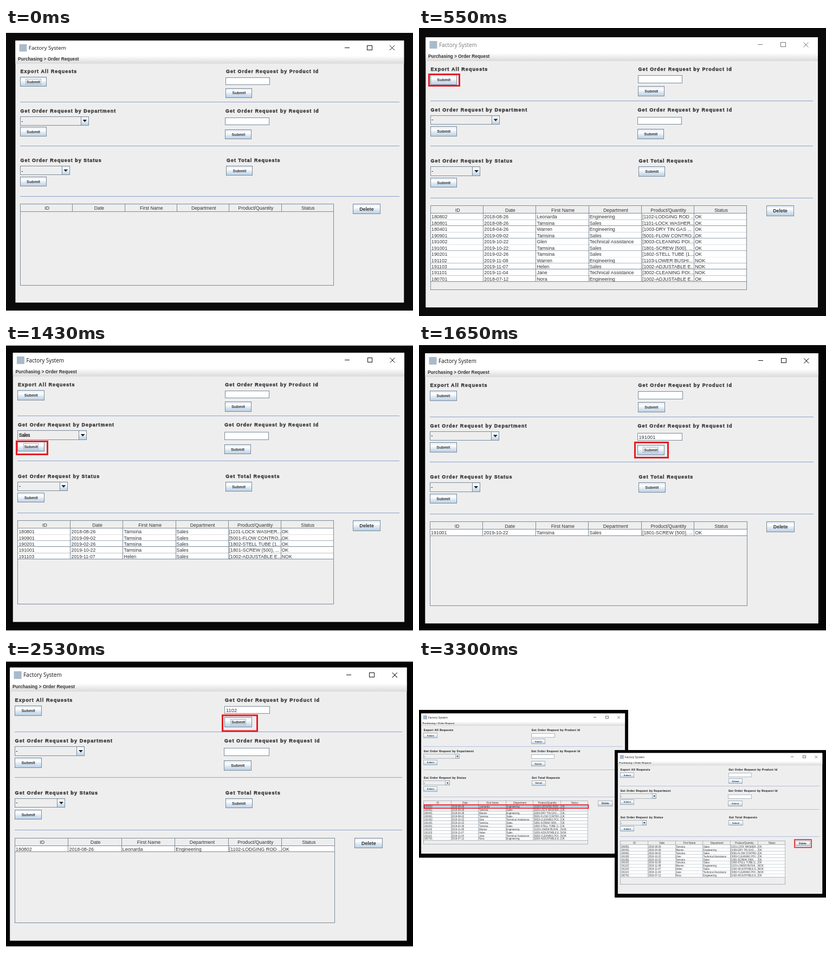
Recreate the animation shown at these times as an HTML page with a canvas. Size 751 by 531 pixels, loop 3.85 s.

```html
<!DOCTYPE html>
<html lang="en">
<head>
<meta charset="utf-8">
<title>Factory System</title>
<style>
  html, body { margin: 0; width: 100%; height: 100%; overflow: hidden; background: #fff; }
  canvas { display: block; }
</style>
</head>
<body>
<canvas id="stage" width="751" height="531"></canvas>
<script>
const ctx = document.getElementById('stage').getContext('2d');
const STEP = 550;
const SANS = '"Liberation Sans", Arial, sans-serif';
const BORDER = '#7a8a99', INK = '#333', RED = '#e61b23';

const columns = ['ID', 'Date', 'First Name', 'Department', 'Product/Quantity', 'Status'];
const orders = `
180802|2018-08-26|Leonarda|Engineering|[1102-LODGING ROD ...|OK
180801|2018-08-26|Tamsina|Sales|[1101-LOCK WASHER...|OK
180401|2018-04-26|Warren|Engineering|[1003-DRY TIN GAS ...|OK
190901|2019-09-02|Tamsina|Sales|[5001-FLOW CONTRO...|OK
191002|2019-10-22|Glen|Technical Assistance|[3003-CLEANING POI...|OK
191001|2019-10-22|Tamsina|Sales|[1801-SCREW (500), ...|OK
190201|2019-02-26|Tamsina|Sales|[1802-STELL TUBE (1...|OK
191102|2019-11-08|Warren|Engineering|[1103-LOWER BUSHI...|NOK
191103|2019-11-07|Helen|Sales|[1002-ADJUSTABLE E...|NOK
191101|2019-11-04|Jane|Technical Assistance|[3002-CLEANING POI...|NOK
180701|2018-07-12|Nora|Engineering|[1002-ADJUSTABLE E...|OK`.trim().split('\n').map(line => line.split('|'));
const pick = (...ids) => ids.map(id => orders.find(order => order[0] === id));

// place: [x, y, x scale, y scale] of the window layout on the stage
const scenes = [
  { dark: '#0a0a0a', top: 9, bottom: 521, windows: [{ place: [5.2, 6.54, .9906, .97], focus: 'export' }] },
  { dark: '#0a0a0a', top: 0, bottom: 531, mark: [18.5, 85.5, 56, 21],
    windows: [{ place: [0, 0, 1, 1], rows: orders, inactive: true }] },
  { dark: '#070707', top: 3, bottom: 528, paper: '#e9eeea', mark: [19.5, 179.5, 57, 24],
    windows: [{ place: [.5, -.94, .998, .9965], focus: 'department', department: 'Sales',
      rows: pick('180801', '190901', '190201', '191001', '191103') }] },
  { dark: '#050506', top: 2, bottom: 528, mark: [398.5, 181.5, 61, 28],
    windows: [{ place: [-1.06, 0, 1.0026, 1], focus: 'request', request: '191001', rows: pick('191001') }] },
  { dark: '#030303', top: 3, bottom: 528, mark: [399.5, 102, 64, 29],
    windows: [{ place: [-5.26, -3.55, 1.012, 1.0115], focus: 'product', product: '1102', rows: pick('180802') }] },
  { dark: '#030303', top: 3, bottom: 527, mark: [398.5, 252.5, 63, 23],
    windows: [{ place: [-4.73, -3.55, 1.0103, 1.0115], focus: 'total', head: ['Total'], rows: [['12']] }] },
  { windows: [
    { back: [0, 92, 386, 272.5], place: [-2.43, 89.66, .5197, .519], rows: orders, selected: 0, mark: [9.5, 267, 303, 6.5] },
    { back: [361, 166, 390, 272], place: [360.5, 162.6, .5214, .521], rows: orders.slice(1), mark: [693, 331.2, 31, 14.5] }
  ] }
];

let place;
const mapX = x => x * place[2] + place[0];
const mapY = y => y * place[3] + place[1];
const snap = v => Math.round(v - .6); // pixel that holds a line centred on v
const lineAlpha = () => Math.min(1, place[2] * 1.1);

function fill(x, y, w, h, color) {
  ctx.fillStyle = color;
  ctx.fillRect(mapX(x), mapY(y), w * place[2], h * place[3]);
}

function path(points, color, close) {
  ctx.beginPath();
  points.forEach(([x, y]) => ctx.lineTo(mapX(x), mapY(y)));
  ctx.lineWidth = place[2];
  ctx.strokeStyle = ctx.fillStyle = color;
  close ? ctx.fill() : ctx.stroke();
}

function line(x1, y1, x2, y2, color = BORDER) {
  const left = snap(mapX(x1)), top = snap(mapY(y1));
  ctx.globalAlpha = lineAlpha();
  ctx.fillStyle = color;
  ctx.fillRect(left, top, snap(mapX(x2)) - left || 1, snap(mapY(y2)) - top || 1);
  ctx.globalAlpha = 1;
}

function frame(x, y, w, h, color = BORDER) {
  const left = snap(mapX(x)), top = snap(mapY(y));
  ctx.globalAlpha = lineAlpha();
  ctx.strokeStyle = color;
  ctx.lineWidth = 1;
  ctx.strokeRect(left + .5, top + .5, snap(mapX(x + w)) - left, snap(mapY(y + h)) - top);
  ctx.globalAlpha = 1;
}

// y is the middle of the capital letters
function text(str, x, y, size, { weight = '', align = 'left', color = INK, family = SANS, spacing = 0, heavy = 0 } = {}) {
  const px = size * place[2];
  ctx.font = `${weight} ${px}px ${family}`;
  ctx.textAlign = align;
  ctx.letterSpacing = spacing * place[2] + 'px';
  ctx.fillStyle = ctx.strokeStyle = color;
  const baseline = mapY(y) + px * .36;
  ctx.fillText(str, mapX(x), baseline);
  if (heavy) {
    ctx.lineWidth = heavy * place[2];
    ctx.strokeText(str, mapX(x), baseline);
  }
}

function gradient(y, h, stops) {
  const g = ctx.createLinearGradient(0, mapY(y), 0, mapY(y + h));
  stops.forEach(([at, color]) => g.addColorStop(at, color));
  return g;
}

function bevel(x, y, w, h) {
  fill(x, y, w, h, gradient(y, h, [[0, '#dde8f3'], [.3, '#fff'], [.6, '#dde8f3'], [1, '#b8cfe5']]));
  frame(x, y, w, h);
}

function button(x, y, focused, label = 'Submit', w = 48.5, h = 17.5, size = 7.4) {
  bevel(x, y, w, h);
  if (focused) frame(x + 10.5, y + 3.5, w - 21, h - 7, '#a3b8cc');
  text(label, x + w / 2, y + h / 2, size, { weight: 'bold', align: 'center' });
}

function field(x, y, value = '') {
  fill(x, y, 81.5, 13.5, '#fff');
  frame(x, y, 81.5, 13.5);
  text(value, x + 2, y + 7.4, 9.2);
}

function combo(y, w, value = '-') {
  frame(21.5, y, w, 16.5);
  bevel(21.5 + w - 14, y, 14, 16.5);
  const x = 21.5 + w - 7, mid = y + 8;
  path([[x - 4, mid - 2], [x + 4, mid - 2], [x, mid + 2.5]], '#222', true);
  text(value, 23.5, mid, 8.2, { color: '#111', heavy: .3 });
}

function heading(str, x, y) {
  text(str, x, y, 9, { weight: 'bold', spacing: 1.07, heavy: .4 });
}

function titleBar(inactive) {
  const color = inactive ? '#777' : '#111';
  fill(12.3, 17.2, 723.7, 29.8, '#fff');
  fill(19.5, 24, 14, 14, '#a9bacb');
  text('Factory System', 37, 31, 9.9, { color, family: '"Open Sans", "Noto Sans", sans-serif' });
  line(626, 31, 635, 31, color);
  frame(668, 26.5, 8.5, 8.5, color);
  path([[709.5, 26.5], [718.5, 35.5]], color);
  path([[718.5, 26.5], [709.5, 35.5]], color);
  fill(12.3, 46, 723.7, 15, gradient(46, 15, [[0, '#fff'], [1, '#dadada']]));
  text('Purchasing > Order Request', 17, 52, 8.4, { weight: 'bold' });
}

function table(head, rows, selected) {
  const left = 21.5, width = 583.5, top = 342, rowHeight = 11.45, col = width / head.length;
  rows.forEach((row, r) => {
    const y = top + r * rowHeight;
    fill(left, y, width, rowHeight, r === selected ? '#b8cfe5' : '#fff');
    line(left, y + rowHeight, left + width, y + rowHeight);
    row.forEach((cell, c) => text(cell, left + c * col + 1.5, y + 6.2, 8.8));
  });
  const bottom = top + rows.length * rowHeight;
  head.forEach((name, c) => {
    const x = left + c * col;
    text(name, x + col / 2 + 1, 335.5, 8.8, { align: 'center' });
    if (c) line(x, 328, x, bottom);
  });
  line(left, top, left + width, top);
  frame(left, 328, width, 154.3);
}

function mark(box, width) {
  ctx.strokeStyle = RED;
  ctx.lineWidth = width;
  ctx.strokeRect(...box);
}

function drawWindow(win) {
  const { focus, head = columns, rows = [] } = win;
  place = win.place;
  if (win.back) {
    ctx.fillStyle = '#030303';
    ctx.fillRect(...win.back);
  }
  fill(12.3, 17.2, 723.7, 498, '#eee');
  titleBar(win.inactive);

  heading('Export All Requests', 21.5, 76);
  button(21.5, 87, focus === 'export');
  heading('Get Order Request by Product Id', 404.5, 76);
  field(404.5, 87.7, win.product);
  button(404.5, 108, focus === 'product');

  heading('Get Order Request by Department', 21.5, 150.6);
  combo(161.5, 127, win.department);
  button(21.5, 182, focus === 'department');
  heading('Get Order Request by Request Id', 403.5, 150.6);
  field(403.5, 164.2, win.request);
  button(403.5, 187, focus === 'request');

  heading('Get Order Request by Status', 21.5, 245.1);
  combo(256, 91.5);
  button(21.5, 276.5, focus === 'status');
  heading('Get Total Requests', 405.5, 245.1);
  button(405.5, 256, focus === 'total');

  for (const y of [134.5, 217.5, 313.5]) line(21.5, y, 728, y, '#8aa0d0');
  table(head, rows, win.selected);
  button(641.2, 328, false, 'Delete', 50.5, 18.3, 8.9);
  if (win.mark) mark(win.mark, 1.6);
}

function draw(now) {
  const scene = scenes[Math.floor(now / STEP) % scenes.length];
  ctx.fillStyle = scene.paper || '#fff';
  ctx.fillRect(0, 0, 751, 531);
  if (scene.dark) {
    ctx.fillStyle = scene.dark;
    ctx.fillRect(0, scene.top, 751, scene.bottom - scene.top);
  }
  scene.windows.forEach(drawWindow);
  if (scene.mark) mark(scene.mark, 3);
  requestAnimationFrame(draw);
}
requestAnimationFrame(draw);
</script>
</body>
</html>
```
